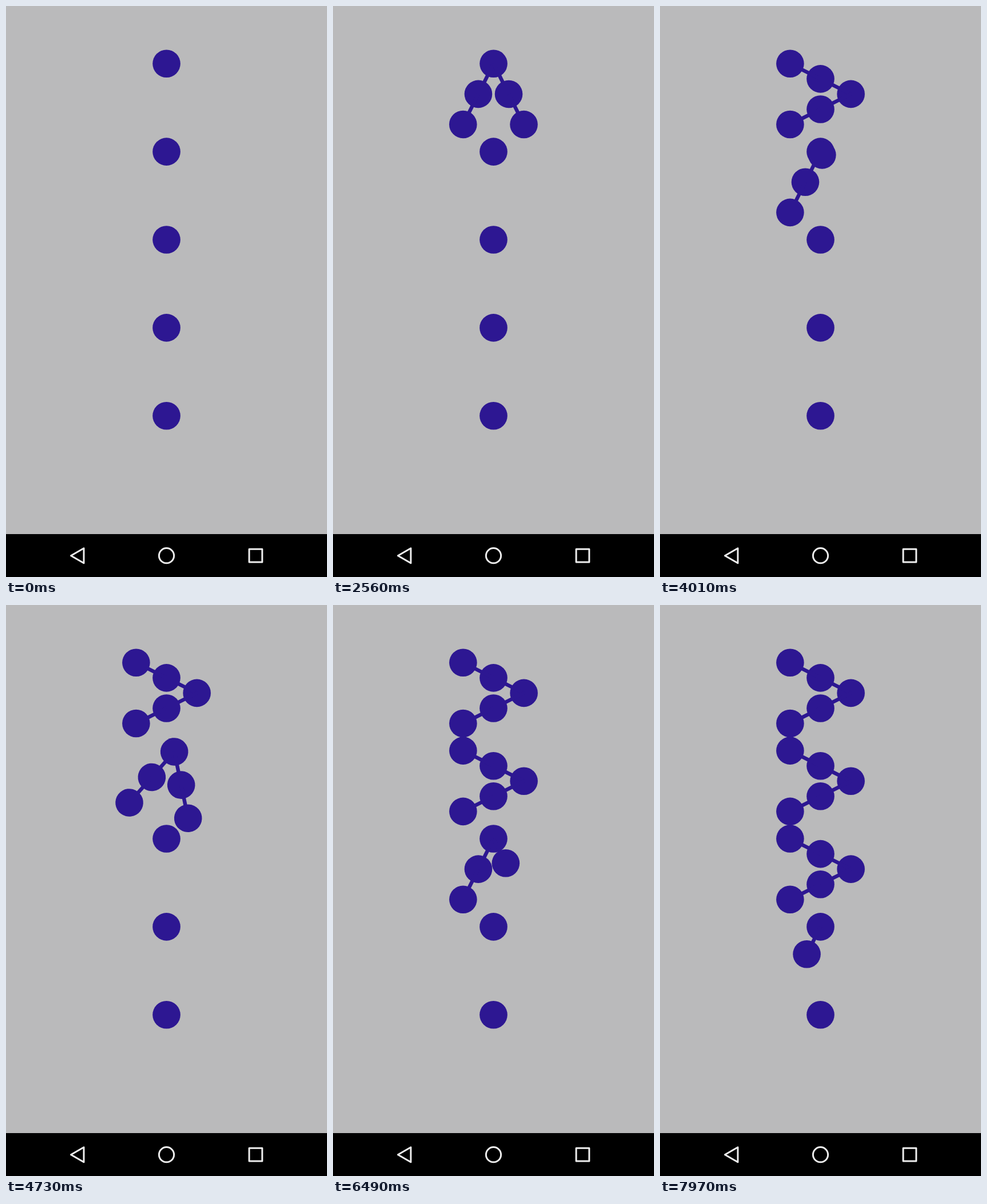
Write an HTML page with a canvas that moves like this. It is 561 px wide and 998 px high and loops after 8 s.

```html
<!DOCTYPE html>
<html lang="en">
<head>
<meta charset="utf-8">
<title>Branching dots</title>
<style>
  html, body { margin: 0; height: 100%; overflow: hidden; background: #bababb; }
  canvas { display: block; }
</style>
</head>
<body>
<canvas id="stage" width="561" height="998"></canvas>
<script>
const ctx = document.getElementById('stage').getContext('2d');
const LOOP = 8000;
const INK = '#2d1792';
const CX = 280.5, TOP = 100.8, GAP = 153.87;
const R = 24.3, D = 53.1;            // dot radius, half size of a figure
const SEG = 340, TURN = 420;         // time per branch segment, time of the turn
const STARTS = [1193, 3259, 5570, 7700, Infinity];

function ease(t) {
  t = Math.min(1, Math.max(0, t));
  return (1 - Math.cos(Math.PI * t)) / 2;
}

function dot(x, y) {
  ctx.beginPath();
  ctx.arc(x, y, R, 0, 2 * Math.PI);
  ctx.fill();
}

// A branch grows from the apex in two segments, each led by a new dot.
function branch(side, time) {
  for (let i = 0; i < 2; i++) {
    const local = time - i * SEG;
    if (local <= 0) return;
    const from = i / 2, to = from + ease(local / SEG) / 2;
    const at = k => [side * D * k, -D + 2 * D * k];
    ctx.beginPath();
    ctx.moveTo(...at(from));
    ctx.lineTo(...at(to));
    ctx.stroke();
    dot(...at(to));
  }
}

function figure(index, time) {
  ctx.save();
  ctx.translate(CX, TOP + GAP * index + D);
  ctx.rotate(ease((time - 4 * SEG) / TURN) * Math.PI / 2);
  dot(0, -D);
  branch(-1, time);
  branch(1, time - 2 * SEG);
  ctx.restore();
}

function navBar() {
  ctx.fillStyle = '#000';
  ctx.fillRect(0, 923, 561, 75);
  ctx.strokeStyle = '#eee';
  ctx.lineWidth = 3;
  ctx.lineJoin = 'round';
  ctx.beginPath();
  ctx.moveTo(113.5, 960.7);
  ctx.lineTo(136, 947.7);
  ctx.lineTo(136, 973.7);
  ctx.closePath();
  ctx.moveTo(293.6, 960.7);
  ctx.arc(CX, 960.7, 13.1, 0, 2 * Math.PI);
  ctx.rect(425, 949.3, 22.8, 22.8);
  ctx.stroke();
}

function draw(time) {
  ctx.fillStyle = '#bababb';
  ctx.fillRect(0, 0, 561, 998);
  ctx.fillStyle = ctx.strokeStyle = INK;
  ctx.lineWidth = 6.5;
  STARTS.forEach((start, i) => figure(i, time - start));
  navBar();
}

const begin = performance.now();
function tick() {
  draw((performance.now() - begin) % LOOP);
  requestAnimationFrame(tick);
}
tick();
</script>
</body>
</html>
```
